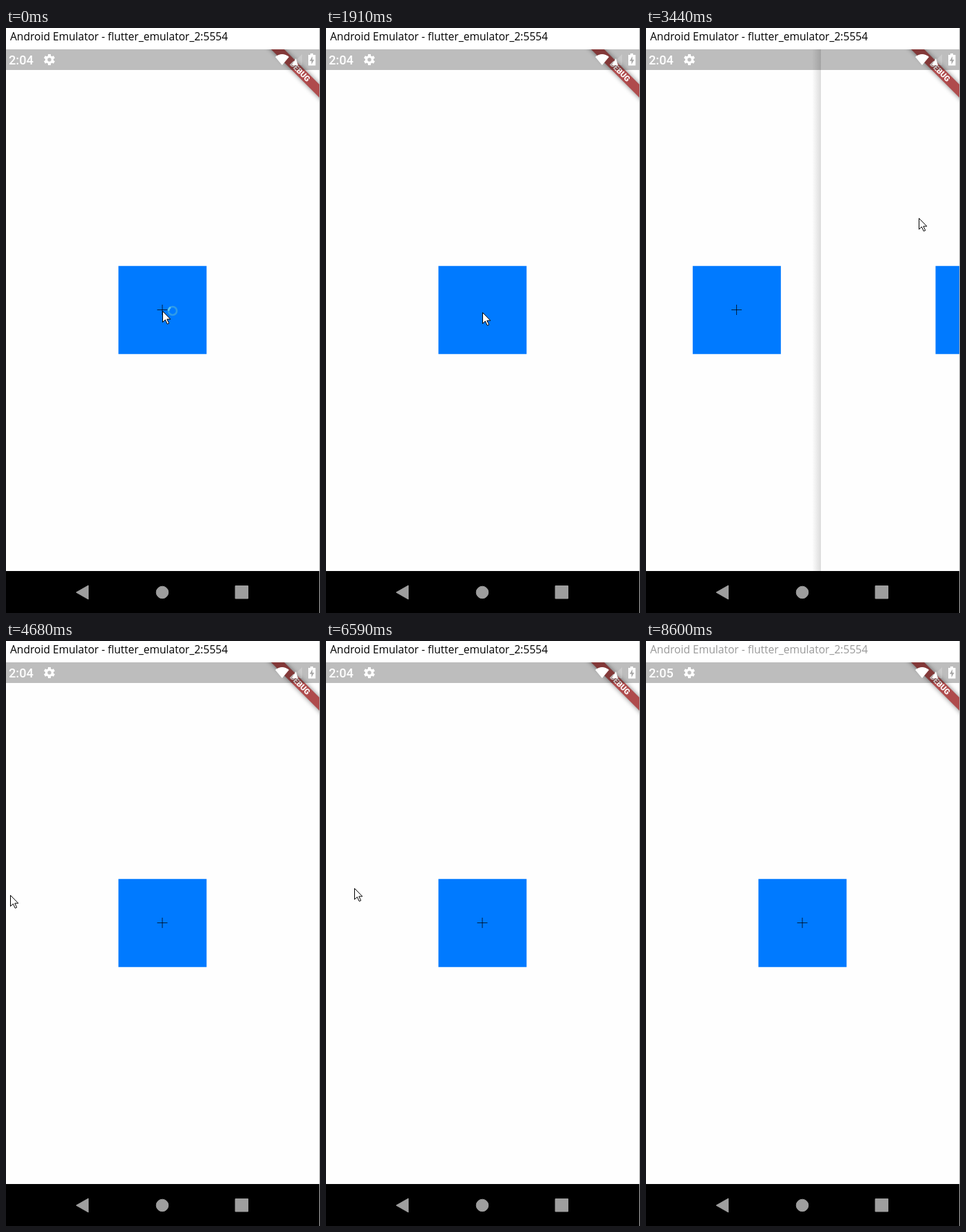
An HTML page for the animation above (8.7 s loop, 456 by 850 pixels).

```html
<!DOCTYPE html>
<html lang="en">
<head>
<meta charset="utf-8">
<title>Page transition</title>
<style>
  html, body { margin: 0; width: 100%; height: 100%; overflow: hidden; background: #fff; }
  svg { display: block; }
  #title { font: 15.6px "Open Sans", sans-serif; }
  #clock { font: 500 18.2px Roboto, sans-serif; }
  #debug { font: 900 11.3px Roboto, sans-serif; }
</style>
</head>
<body>
<svg width="456" height="850" viewBox="0 0 456 850">
  <defs>
    <g id="page">
      <path fill="#fefefe" d="M0 31H455V789H0z"/>
      <path fill="#007aff" d="M163.300 345.800h128v128h-128z"/>
    </g>
    <linearGradient id="fade">
      <stop offset="0" stop-opacity="0"/>
      <stop offset="1" stop-opacity=".14"/>
    </linearGradient>
    <filter id="blur" x="-50%" y="-50%" width="200%" height="200%">
      <feGaussianBlur stdDeviation="3.8"/>
    </filter>
  </defs>

  <text id="title" x="6" y="18">Android Emulator - flutter_emulator_2:5554</text>

  <svg y="31" width="455" height="758" viewBox="0 31 455 758">
    <g id="first">
      <use href="#page"/>
      <path stroke="#000" stroke-opacity=".75" d="M219.500 409.500h15M227 402v15"/>
    </g>
    <g id="second">
      <path fill="url(#fade)" d="M-16 31h13v758h-13z"/>
      <use href="#page"/>
      <path fill="#fefefe" d="M-3 31h4v758h-4z"/>
    </g>
    <path opacity=".5" filter="url(#blur)" d="M375 21h19l71 71v19z"/>
    <path fill="#af4b4c" d="M375 21h19l71 71v19z"/>
    <text id="debug" fill="#fff" text-anchor="middle" transform="translate(427 63) rotate(45)" y="4">DEBUG</text>
    <path fill-opacity=".26" d="M0 31h455v30H0z"/>
  </svg>

  <g fill="#fff">
    <text id="clock" x="4" y="53"></text>
    <g transform="translate(63 46)">
      <circle r="4.4" fill="none" stroke="#fff" stroke-width="3.4"/>
      <path stroke="#fff" stroke-width="4" d="M0-8v3M0 8v-3M-7-4l2.600 1.500M7 4l-2.600-1.500M-7 4l2.600-1.500M7-4l-2.600 1.500"/>
    </g>
    <path d="M391 42q10-8 20 0L401 54z"/>
    <path opacity=".2" d="M414 54h16V38z"/>
    <path d="M415 54l6-10 3 10z"/>
    <path d="M442 37h4v2h3.500v15.500h-10.500V39h3z"/>
    <path fill="#aaa" d="M445 41l-4 7h2.600v5l4-7h-2.600z"/>
  </g>

  <path d="M0 789h455V850H0z"/>
  <g fill="#9e9e9e" stroke="#9e9e9e" stroke-linejoin="round">
    <path d="M102 820l17.500-10v20z"/>
    <circle cx="227" cy="820" r="8.800"/>
    <path d="M333 810.500h18.500v18.500H333z"/>
  </g>
  <path stroke="#aaa" d="M455.500 0v850"/>

  <g id="ring" fill="none" stroke-width="2.600">
    <circle r="6" stroke="#2f9be8"/>
    <path stroke="#5cc4f0" d="M-6 0A6 6 0 0 1-3-5.200"/>
  </g>
  <path id="cursor" fill="#fff" stroke="#000" d="M.5.500v16l3.800-3.600 3 6.300 2.400-1.100-2.900-6h5z"/>
</svg>

<script>
const LOOP = 8700, WIDTH = 455, REFRESH = 136.5, FIRST_SWIPE = 3584, PERIOD = 950;
const [title, clock, first, second, ring, cursor] =
  ["title", "clock", "first", "second", "ring", "cursor"]
    .map(id => document.getElementById(id));

const progress = (t, start, length) => Math.min(1, Math.max(0, (t - start) / length));
const easeOut = u => 1 - (1 - u) ** 2;
const smooth = u => (1 - Math.cos(Math.PI * u)) / 2;

// Where the pointer rests after each swipe
const SQUARE = [227, 411], EDGE = [6, 378], FAR = [396, 276];
const rests = [SQUARE, [6, 369], [248, 399], [41, 359]];
const swipes = rests.map((rest, i) => {
  const end = FIRST_SWIPE + i * PERIOD;
  return { rest, end, push: i ? end - 720 : 900 };
});

// The pointer glides between these stops: [time, [x, y]]
const stops = [
  [900, SQUARE], [1380, [227, 413]], [1830, [227, 413]],
  [2250, EDGE], [2580, [240, 350]], [2880, EDGE]
];
for (const { rest, end, push } of swipes) {
  if (push > FIRST_SWIPE) stops.push([push - 50, SQUARE], [push + 100, SQUARE]);
  stops.push([end - 300, EDGE], [end - 138, FAR], [end - 110, FAR],
             [end + 130, rest], [end + 180, rest]);
}
stops.push([6860, [-20, 380]], [7100, [-20, 380]], [8150, [440, 860]]);

function pointerAt(t) {
  const next = stops.findIndex(([time]) => time > t);
  if (next < 1) return stops.at(next)[1];
  const [t0, from] = stops[next - 1], [t1, to] = stops[next];
  const k = smooth(progress(t, t0, t1 - t0));
  return from.map((value, i) => Math.round(value + (to[i] - value) * k));
}

// Share of the second page in view: pushed by a tap, pulled out by a swipe
function pageAt(t) {
  const trial = .55 * Math.sin(Math.PI * progress(t, 2280, 600)) ** 2;
  const shown = swipes.reduce((sum, { push, end }) =>
    sum + easeOut(progress(t, push, 440)) - smooth(progress(t, end - 300, 300)), 0);
  return Math.min(1, Math.max(0, shown - trial));
}

function move(node, x, y = 0) {
  node.setAttribute("transform", `translate(${x} ${y})`);
}

function draw() {
  const t = performance.now() % LOOP;
  const tick = Math.floor((t + 10 - 3310) / REFRESH) * REFRESH + 3310;
  const page = pageAt(tick);
  move(first, -WIDTH / 3 * (1 - (1 - page) ** 1.74));
  move(second, page > .001 ? WIDTH * (1 - page) : 2 * WIDTH);
  move(cursor, ...pointerAt(tick));

  ring.setAttribute("transform", `translate(242 411) rotate(${t < 120 ? 0 : 60})`);
  ring.setAttribute("visibility", t < 250 ? "visible" : "hidden");
  clock.textContent = t < 8180 ? "2:04" : "2:05";
  const inactive = t >= 8600 || (t >= 6860 && t < 7130);
  title.setAttribute("fill", inactive ? "#999" : "#000");
  requestAnimationFrame(draw);
}
draw();
</script>
</body>
</html>
```
